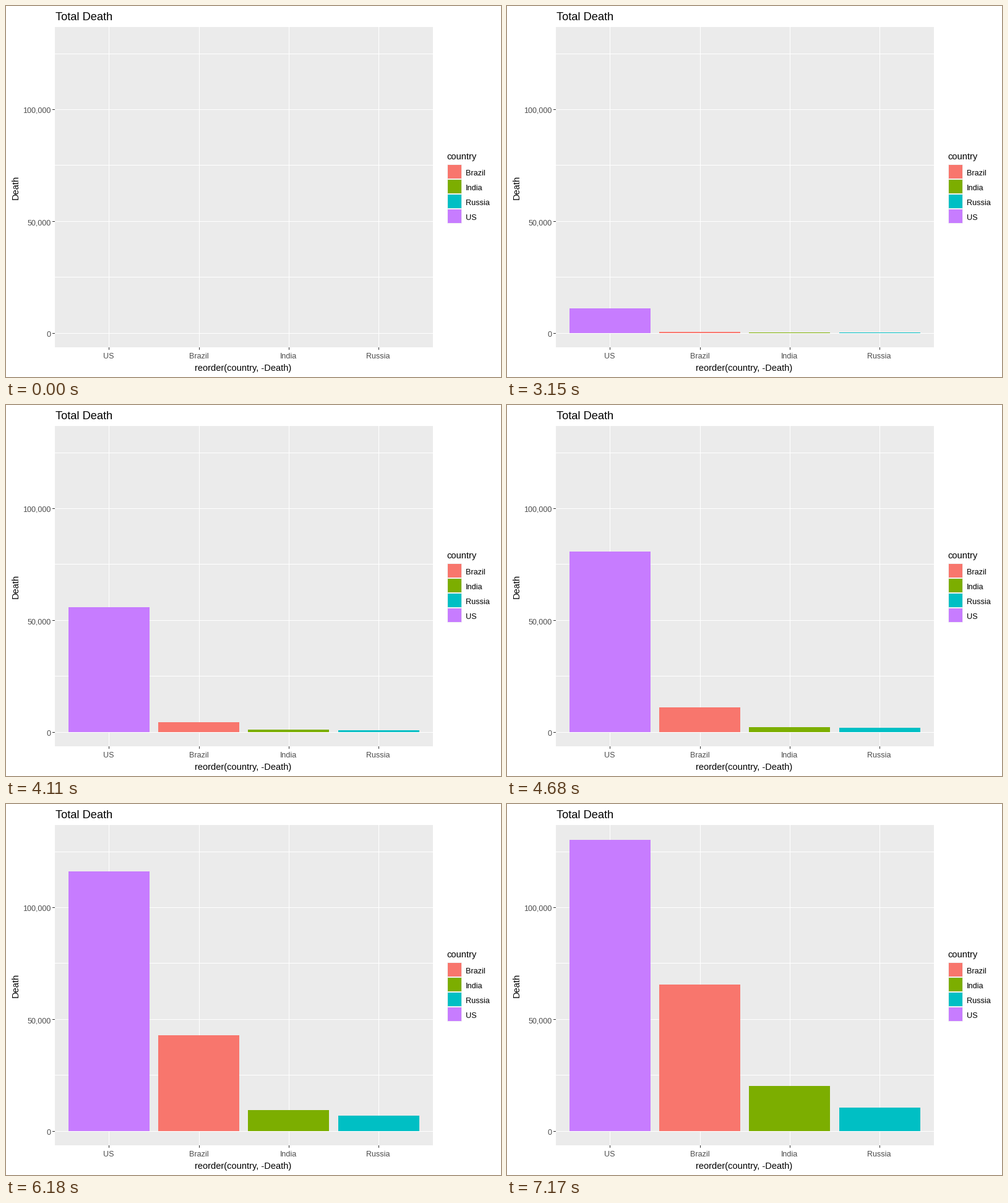
A matplotlib script for the animation above (9 s loop, 800 by 600 pixels).

```python
import numpy as np
import matplotlib.pyplot as plt
from matplotlib.animation import FuncAnimation
from matplotlib.patches import Rectangle

W, H, DPI = 800, 600, 100
FRAMES, MOVING, INTERVAL = 300, 239, 30
LAST_DAY = 166
LEFT, RIGHT, TOP, BOTTOM = 79, 690, 34, 552
BASE = 529                                   # pixel row of the zero line
SCALE = (BOTTOM - TOP) / 1.1 / 130285        # pixels per death
BAR_W = 131
GREY = "#4D4D4D"

plt.rcParams["font.family"] = "Liberation Sans"

# Key Sundays; deaths between them follow a smooth curve in log space.
DAYS = np.array([39, 60, 74, 81, 95, 109, 123, 144, 165, 172])

# name, colour, bar left edge, grid column, deaths on the key days
COUNTRIES = [
    ("US", "#C77CFF", 101, 166,
     [5.5, 480, 12500, 26700, 55600, 81300, 98850, 116550, 129800, 134000]),
    ("Brazil", "#F8766D", 246, 312,
     [.01, 17, 500, 1250, 4350, 11300, 22600, 43400, 64750, 72100]),
    ("India", "#7CAE00", 391, 457,
     [.01, 7, 99, 335, 890, 2250, 4000, 9500, 19800, 23200]),
    ("Russia", "#00BFC4", 537, 602,
     [.01, 1.5, 45, 130, 740, 1950, 3480, 6930, 10150, 11300]),
]


def deaths_at(day, keys):
    """Cubic Hermite curve through the logs of the key values."""
    if day < DAYS[0]:
        return 0
    logs = np.log(keys)
    slopes = np.gradient(logs, DAYS)
    i = min(np.searchsorted(DAYS, day, side="right"), len(DAYS) - 1) - 1
    span = DAYS[i + 1] - DAYS[i]
    t = (day - DAYS[i]) / span
    ease = t * t * (3 - 2 * t)
    bend = t * (1 - t) * ((1 - t) * slopes[i] - t * slopes[i + 1])
    return np.exp(logs[i] + (logs[i + 1] - logs[i]) * ease + span * bend)


def weekly(day):
    """Reporting runs slower around each Sunday."""
    return day - 0.35 * np.sin(2 * np.pi * (day - 4) / 7)


fig = plt.figure(figsize=(W / DPI, H / DPI), dpi=DPI, facecolor="white")
ax = fig.add_axes([0, 0, 1, 1])
ax.set_xlim(0, W)
ax.set_ylim(H, 0)
ax.axis("off")


def box(x, y, w, h, color, z=1):
    return ax.add_patch(Rectangle((x, y), w, h, fc=color, lw=0,
                                  antialiased=False, zorder=z))


def label(x, y, s, px, color="black", **kw):
    ax.text(x, y, s, fontsize=px * 72 / DPI, color=color,
            va="baseline", **kw)


# Panel, grid and axes
box(LEFT, TOP, RIGHT - LEFT, BOTTOM - TOP, "#EBEBEB")
for row in (438, 257, 77):
    box(LEFT, row, RIGHT - LEFT, 1, "white", 2)
for row, text in ((BASE, "0"), (348, "50,000"), (167, "100,000")):
    box(LEFT, row, RIGHT - LEFT, 1, "white", 2)
    box(LEFT - 4, row, 4, 1, "#333333")
    label(72.3, row + 6, text, 12.5, GREY, ha="right")
for name, _, _, col, _ in COUNTRIES:
    box(col, TOP, 1, BOTTOM - TOP, "white", 2)
    box(col, BOTTOM, 1, 4, "#333333")
    label(col - 0.3, 570, name, 12.5, GREY, ha="center")

label(79.5, 23, "Total Death", 18.3)
label(383.5, 590, "reorder(country, -Death)", 14.67, ha="center")
label(20, 293, "Death", 14.67, ha="center", rotation=90,
      rotation_mode="anchor")

# Legend
label(712.5, 248, "country", 14.67)
box(713, 256, 24, 96, "#F2F2F2")
for i, (name, color, *_) in enumerate(sorted(COUNTRIES)):
    box(714, 257 + 24 * i, 22, 22, color, 2)
    label(743.3, 274 + 24 * i, name, 12.6)

bars = [box(x, BASE, BAR_W, 0, color, 3) for _, color, x, *_ in COUNTRIES]


def update(n):
    day = weekly(min(n / MOVING, 1) * LAST_DAY)
    for bar, (*_, keys) in zip(bars, COUNTRIES):
        h = max(0, np.ceil(deaths_at(day, keys) * SCALE - 0.03))
        bar.set_y(BASE - h)
        bar.set_height(h)
        bar.set_visible(h > 0)
    return bars


anim = FuncAnimation(fig, update, frames=FRAMES, interval=INTERVAL,
                     repeat=True, repeat_delay=0, blit=False)
plt.show()
```
